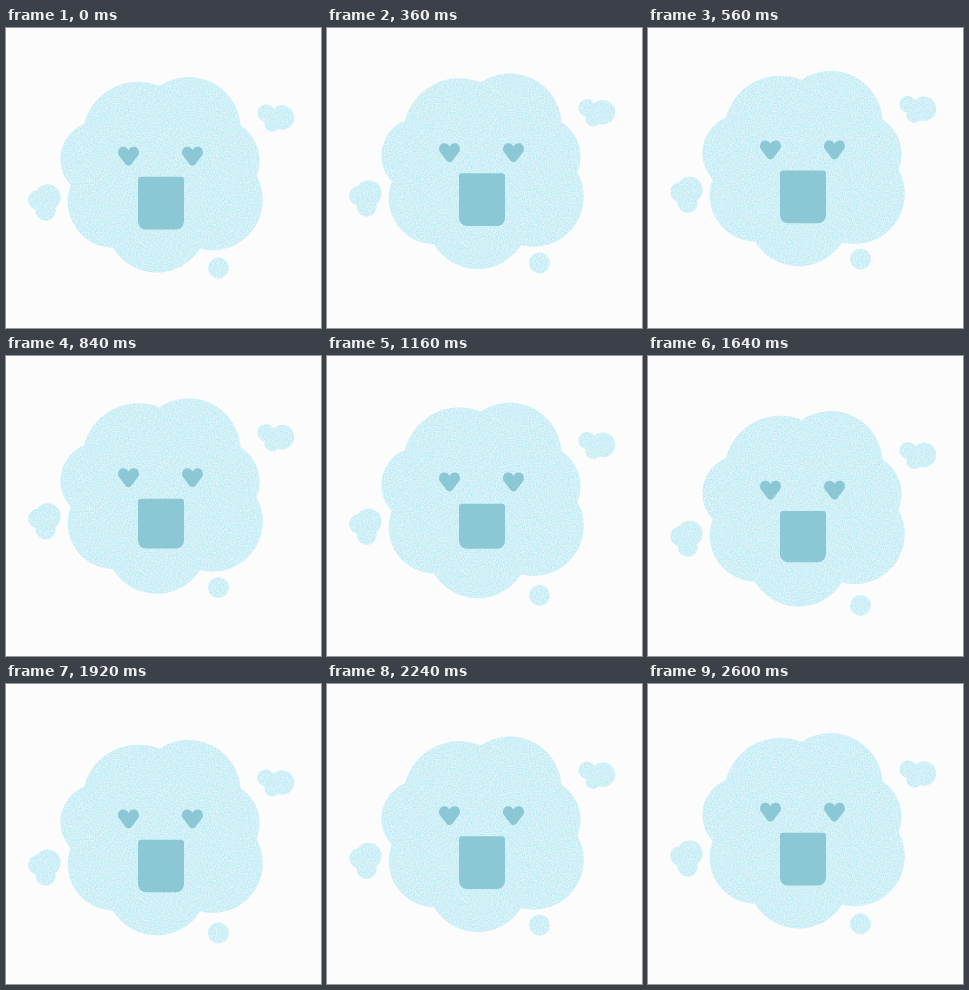
An HTML page for the animation above (2640 ms loop, 315 by 300 pixels).

```html
<!DOCTYPE html>
<html lang="en">
<head>
<meta charset="utf-8">
<title>Happy cloud</title>
<style>
  html, body { margin: 0; width: 100%; height: 100%; overflow: hidden; background: #fcfcfc; }
  svg { display: block; width: 315px; height: 300px; }
</style>
</head>
<body>
<svg viewBox="0 0 315 300">
  <defs>
    <filter id="grain" filterUnits="userSpaceOnUse" x="0" y="0" width="315" height="300" color-interpolation-filters="sRGB">
      <feTurbulence type="fractalNoise" baseFrequency=".85" numOctaves="2" seed="4"/>
      <feColorMatrix values="0 0 0 0 1  0 0 0 0 1  0 0 0 0 1  0 0 0 1.2 -.3"/>
      <feComposite in2="SourceGraphic" operator="in" result="specks"/>
      <feMerge><feMergeNode in="SourceGraphic"/><feMergeNode in="specks"/></feMerge>
    </filter>
    <path id="heart" d="M0-6C-2-10.5-10.5-11-10.5-3C-10.5-.5-7.5 1.5-3.2 8Q0 11.5 3.2 8C7.5 1.5 10.5-.5 10.5-3C10.5-11 2-10.5 0-6Z"/>
  </defs>
  <g fill="#bceaf4" filter="url(#grain)">
    <path id="cloud" d="M78 96A56 56 0 0 1 153.5 58A52 52 0 0 1 234.5 97.5A41.5 41.5 0 0 1 250.5 148
      A50 50 0 0 1 194 220.5A51 51 0 0 1 107 219.7A46 46 0 0 1 64.8 157.2A38 38 0 0 1 78 96Z"/>
    <path id="left" d="M31 162A13 13 0 1 1 49.3 180A10 10 0 1 1 29.7 181.6A10 10 0 0 1 31 162Z"/>
    <path id="right" d="M267.3 80.7A12.3 12.3 0 1 1 271.6 101A7.5 7.5 0 0 1 259 93.5A8.5 8.5 0 1 1 267.3 80.7Z"/>
    <circle id="drop" cx="212.5" cy="240" r="10.4"/>
  </g>
  <g id="face" fill="#80c1cf" opacity=".85">
    <use href="#heart" x="122.5" y="128"/>
    <use href="#heart" x="186.5" y="128"/>
    <path id="mouth"/>
  </g>
</svg>
<script>
const LOOP = 2640, STEP = 40;
const $ = id => document.getElementById(id);

// Eased progress from 0 to 1 between two times
function ease(t, from, to) {
  const p = Math.min(1, Math.max(0, (t - from) / (to - from)));
  return (1 - Math.cos(Math.PI * p)) / 2;
}

// Rise until `high`, sink until `low`, then return to rest between `leave` and `rest`
const bob = (t, size, high, low, leave, rest) =>
  size * (2 * ease(t, high, low) - ease(t, 0, high) - ease(t, leave, rest));

const shift = (id, y) => $(id).setAttribute('transform', `translate(0 ${y})`);

function drawMouth(squash) {
  const top = 148.8 + 1.4 * squash, bottom = 201.5 - 6.6 * squash;
  $('mouth').setAttribute('d',
    `M135 ${top}H175a3 3 0 0 1 3 3V${bottom - 8}a8 8 0 0 1-8 8H140a8 8 0 0 1-8-8V${top + 3}a3 3 0 0 1 3-3Z`);
}

function draw(now) {
  const t = Math.floor(now % LOOP / STEP) * STEP;
  const body = bob(t, 7, 720, 1840, 1840, LOOP);
  const light = bob(t, 9.5, 680, 1680, 1840, 2360);
  shift('cloud', body);
  shift('face', body);
  shift('left', bob(t, 9.5, 780, 1820, 1820, 2440));
  shift('right', light);
  shift('drop', light);
  drawMouth(ease(t, 560, 1240) - ease(t, 1240, 1800));
  requestAnimationFrame(() => draw(performance.now() - start));
}
const start = performance.now();
draw(0);
</script>
</body>
</html>
```
